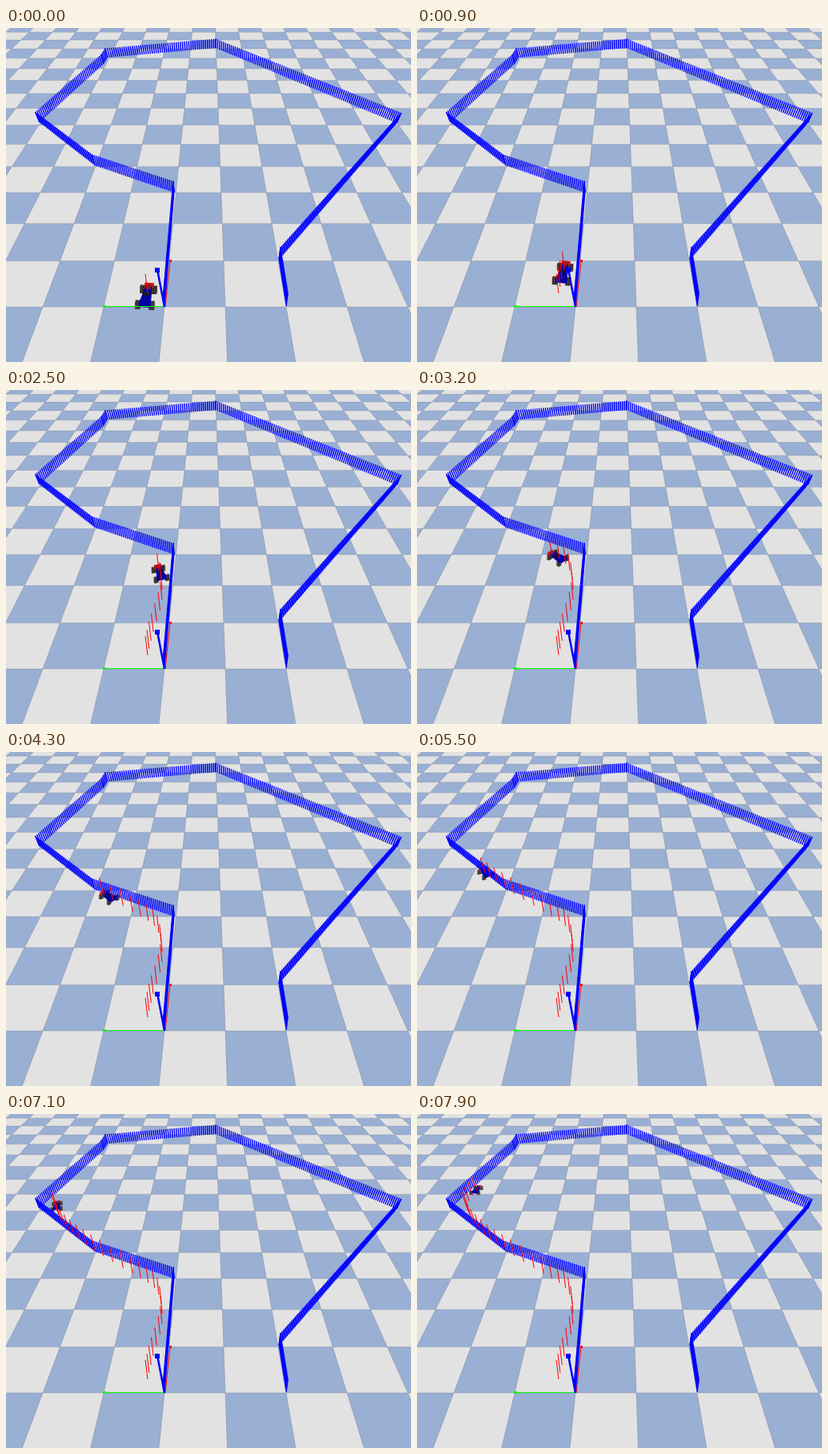
Write an HTML page with a canvas that moves like this. It is 506 by 418 pixels and loops after 8 s.

```html
<!DOCTYPE html>
<html>
<head>
<meta charset="utf-8">
<style>
html, body { margin: 0; width: 100%; height: 100%; overflow: hidden; }
canvas { display: block; }
</style>
</head>
<body>
<canvas id="stage" width="506" height="418"></canvas>
<script>
const ctx = document.getElementById('stage').getContext('2d');
const LOOP = 8000, STEP = 100;
const LEG = 900;                          // ms between route points
const MARK_EVERY = 265, MARK_LEAD = 200;  // trail marks are set ahead of the car
const HORIZON = -208, VANISH = 254, TILE = 76, BASE = 557;

const walls = [
  [198, 349], [210, 206], [111, 172], [42, 118], [122, 45],
  [127, 37], [262, 25], [488, 119], [341, 290], [350, 348]
];
const route = [
  [176, 336], [183, 307], [195, 262], [189, 222], [160, 201],
  [119, 176], [88, 154], [69, 132], [64, 113], [77, 92]
];

function line(x1, y1, x2, y2, color, width = 1) {
  ctx.strokeStyle = color;
  ctx.lineWidth = width;
  ctx.beginPath();
  ctx.moveTo(x1, y1);
  ctx.lineTo(x2, y2);
  ctx.stroke();
}

function rect(color, x, y, w, h) {
  ctx.fillStyle = color;
  ctx.fillRect(x, y, w, h);
}

function shape(color, points) {
  ctx.fillStyle = color;
  ctx.beginPath();
  points.forEach(p => ctx.lineTo(...p));
  ctx.fill();
}

// Upright post, leaning away from the middle of the view
function post(x, y, height, color, width) {
  line(x, y, x + height * (x - 258) / 40, y - height * (11 + y / 60), color, width);
}

// Floor coordinates to screen and back
function project(col, row) {
  const depth = 1 / (1 / BASE + 0.00020667 * row);
  return [VANISH + (col * TILE + 198 - VANISH) * depth / BASE, depth + HORIZON];
}

function unproject(x, y) {
  const depth = y - HORIZON;
  return [((x - VANISH) * BASE / depth + VANISH - 198) / TILE, (1 / depth - 1 / BASE) / 0.00020667];
}

function drawFloor() {
  rect('#e2e2e2', 0, 0, 506, 418);
  for (let row = -2; row < 16; row++) {
    for (let col = -11; col < 13; col++) {
      if ((row + col) % 2) continue;
      shape('#9aafd4', [project(col, row), project(col + 1, row),
        project(col + 1, row + 1), project(col, row + 1)]);
    }
  }
  const seam = 'rgba(100,105,115,.4)';
  for (let col = -11; col < 14; col++) line(...project(col, -2), ...project(col, 16), seam, 0.8);
  for (let row = -1; row < 16; row++) line(...project(-11, row), ...project(13, row), seam, 0.6);
}

function drawWalls() {
  for (let i = 1; i < walls.length; i++) {
    const [ax, ay] = walls[i - 1], [bx, by] = walls[i];
    const count = Math.ceil(Math.hypot(bx - ax, by - ay) / 2.6);
    for (let k = 0; k <= count; k++) {
      post(ax + (bx - ax) * k / count, ay + (by - ay) * k / count, 1, '#00f', 1.4);
    }
  }
}

function drawAxes() {
  line(123, 348.5, 198, 348.5, '#0f0');
  rect('#0f0', 121, 347, 4, 3);
  line(199, 349, 205, 291, '#f00');
  rect('#f00', 204, 290, 3, 3);
  line(198, 349, 189, 302, '#00f', 2.5);
  rect('#00f', 186, 300, 6, 6);
}

// Smooth curve through the route points
function carAt(t) {
  const leg = Math.min(Math.floor(t / LEG), route.length - 2);
  const u = t / LEG - leg;
  const [a, b, c, d] = [-1, 0, 1, 2].map(n =>
    route[Math.max(0, Math.min(route.length - 1, leg + n))]);
  return [0, 1].map(n => b[n] + u / 2 * (c[n] - a[n] +
    u * (2 * a[n] - 5 * b[n] + 4 * c[n] - d[n] + u * (3 * (b[n] - c[n]) + d[n] - a[n]))));
}

function drawCar(t) {
  const [x, y] = carAt(t);
  const [col, row] = unproject(x, y);
  const [nextCol, nextRow] = unproject(...carAt(t + 50));
  const heading = Math.atan2(nextCol - col, nextRow - row);
  const size = (y - HORIZON) / BASE;
  const [fx, fy] = project(col, row + 0.1);

  function layer(lift, draw) {
    ctx.save();
    ctx.transform(size, 0, (x - fx) * 10 / TILE, (y - fy) * 10 / TILE, x, y - lift * size);
    ctx.rotate(heading);
    draw();
    ctx.restore();
  }
  for (const lift of [-3, 0, 3]) {
    layer(lift, () => {
      for (const side of [-1, 1]) {
        rect('#41332f', side * 9 - 3.5, 10, 7, 7);
        rect('#41332f', side * 8 - 3, -14, 6, 6);
      }
      rect('#222', -7, -11, 14, 3);
    });
  }
  for (const lift of [0, 3]) {
    layer(lift, () => {
      rect('#c01818', -6, -18, 12, 5);
      shape('#0000a8', [[-4, -13], [4, -13], [8, 17], [-8, 17]]);
      rect('#802028', -3, -13, 6, 5);
      rect('#151530', -4, -4, 8, 7);
    });
  }
}

function drawMarks(t) {
  for (let set = 0; set <= t; set += MARK_EVERY) {
    post(...carAt(set + MARK_LEAD), 1.45, '#f00');
  }
}

function frame() {
  const t = Math.floor(performance.now() % LOOP / STEP) * STEP;
  drawFloor();
  drawCar(t);
  drawAxes();
  drawWalls();
  drawMarks(t);
  requestAnimationFrame(frame);
}

requestAnimationFrame(frame);
</script>
</body>
</html>
```
